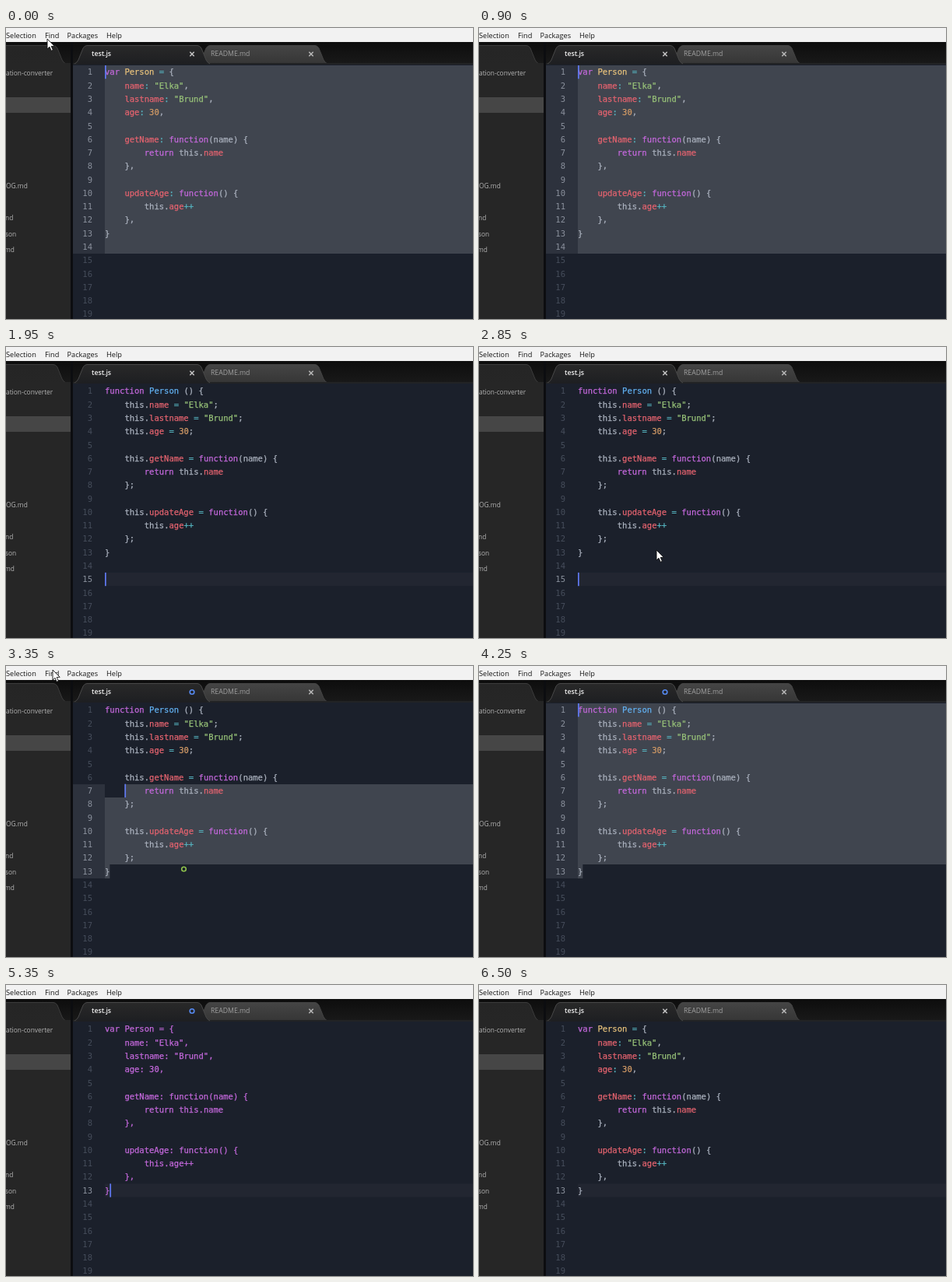
An HTML page with a canvas that plays this animation: 600x374 px, repeating every 6550 ms.

```html
<!DOCTYPE html>
<html lang="en">
<head>
<meta charset="utf-8">
<title>Editor demo</title>
<style>
html, body { margin: 0; width: 100%; height: 100%; overflow: hidden; background: #1b202b; }
canvas { display: block; width: 600px; height: 374px; }
</style>
</head>
<body>
<canvas id="stage" width="600" height="374"></canvas>
<script>
const ctx = document.getElementById('stage').getContext('2d');
const LOOP = 6550, STEP = 50;
const TOP = 48, LINE = 17.28, LEFT = 127, CHAR = 6.345;
const UI = '"Open Sans", "Noto Sans", sans-serif';
const MONO = '10.5px "DejaVu Sans Mono", "Liberation Mono", monospace';
const C = {
  text: '#abb2bf', key: '#c468dc', red: '#e4636f', green: '#98c379', num: '#d19a66',
  type: '#e5c07b', fn: '#61afef', op: '#56b6c2'
};

const OBJECT = [
  'var Person = {',
  '    name: "Elka",',
  '    lastname: "Brund",',
  '    age: 30,',
  '',
  '    getName: function(name) {',
  '        return this.name',
  '    },',
  '',
  '    updateAge: function() {',
  '        this.age++',
  '    },',
  '}'
];
const CLASS = OBJECT.map((line, i) => {
  if (i === 0) return 'function Person () {';
  return line.replace(/^ {4}(\w+): /, '    this.$1 = ')
    .replace(/,$/, ';');
});

const COMMANDS = [
  'Editor: *Join Lines', '*Js Object Notation Converter', 'Bookmarks: *Jump To Next',
  'Bookmarks: *Jump To Previous', 'Pro*ject Find: Show', 'Pro*ject Find: Toggle',
  'Pro*ject Find: Show In Current', 'Editor: Copy Pro*ject Path', 'Custom: Delete All Pro*ject'
];

function rect(x, y, w, h, fill) {
  ctx.fillStyle = fill;
  ctx.fillRect(x, y, w, h);
}

function shade(y0, y1, a, b) {
  const g = ctx.createLinearGradient(0, y0, 0, y1);
  g.addColorStop(0, a);
  g.addColorStop(1, b);
  return g;
}

function label(str, x, y, size, color, weight = 400) {
  ctx.font = `${weight} ${size}px ${UI}`;
  ctx.fillStyle = color;
  ctx.fillText(str, x, y);
  return x + ctx.measureText(str).width;
}

function tokenColor(tok, before, after) {
  if (/^(var|function|return)$/.test(tok)) return C.key;
  if (tok[0] === '"') return C.green;
  if (/^\d/.test(tok)) return C.num;
  if (/^(=|:|\++)$/.test(tok)) return C.op;
  if (tok === 'Person') return before.startsWith('var') ? C.type : C.fn;
  if (/^\w/.test(tok) && (before.endsWith('.') || after[0] === ':')) return C.red;
  return C.text;
}

function drawCode(lines, plain) {
  ctx.font = MONO;
  ctx.lineWidth = 0.25;
  lines.forEach((line, i) => {
    for (const m of line.matchAll(/"[^"]*"|\w+|\++|[^\s\w]/g)) {
      const end = m.index + m[0].length;
      const x = LEFT + m.index * CHAR, y = TOP + i * LINE + 12.4;
      ctx.fillStyle = plain ? C.key : tokenColor(m[0], line.slice(0, m.index), line.slice(end));
      ctx.strokeStyle = ctx.fillStyle;
      ctx.fillText(m[0], x, y);
      ctx.strokeText(m[0], x, y);
    }
  });
}

function tabPath(x0, x1) {
  ctx.beginPath();
  ctx.moveTo(x0, 46);
  ctx.quadraticCurveTo(x0 + 3, 45, x0 + 5, 41);
  ctx.lineTo(x0 + 11, 26);
  ctx.quadraticCurveTo(x0 + 13, 22.5, x0 + 16, 22.5);
  ctx.lineTo(x1 - 16, 22.5);
  ctx.quadraticCurveTo(x1 - 13, 22.5, x1 - 11, 26);
  ctx.lineTo(x1 - 5, 41);
  ctx.quadraticCurveTo(x1 - 3, 45, x1, 46);
}

function tab(x0, x1, a, b, edge) {
  tabPath(x0, x1);
  ctx.fillStyle = shade(22, 46, a, b);
  ctx.fill();
  ctx.strokeStyle = edge;
  ctx.lineWidth = 1;
  ctx.stroke();
}

function cross(x, y, color) {
  ctx.strokeStyle = color;
  ctx.lineWidth = 1.5;
  ctx.beginPath();
  ctx.moveTo(x - 2.7, y - 2.7); ctx.lineTo(x + 2.7, y + 2.7);
  ctx.moveTo(x + 2.7, y - 2.7); ctx.lineTo(x - 2.7, y + 2.7);
  ctx.stroke();
}

function ring(x, y, r, color) {
  ctx.strokeStyle = color;
  ctx.lineWidth = 1.6;
  ctx.beginPath();
  ctx.arc(x, y, r, 0, 7);
  ctx.stroke();
}

function drawChrome(dirty) {
  rect(0, 18, 600, 29, shade(18, 46, '#0d0d0d', '#191919'));
  rect(0, 46, 83, 328, '#262626');
  rect(0, 89, 83, 20, '#464646');
  tab(-30, 77, '#252525', '#262626', '#3c3c3c');
  rect(0, 45, 83, 2, '#262626');
  rect(83, 18, 3, 356, '#0c0d10');
  tab(246, 413, '#454545', '#363636', '#444');
  rect(86, 45, 514, 2, '#222325');
  tab(88, 262, '#292929', '#1e1f22', '#484848');
  rect(92, 45, 166, 2, '#1e1f22');
  label('test.js', 110, 36.2, 8.7, '#f2f2f2', 600);
  label('README.md', 263, 36.2, 8.7, '#a0a0a0');
  if (dirty) ring(239, 33.5, 2.8, '#568af2'); else cross(239, 33.5, '#c4c4c4');
  cross(392, 33.5, '#b8b8b8');

  rect(0, 0, 600, 18, '#f2f2f2');
  [['Selection', 0], ['Find', 50], ['Packages', 78.5], ['Help', 129]]
    .forEach(([s, x]) => label(s, x, 13, 9.2, '#161616'));
  [['ation-converter', 0, 58], ['OG.md', 0, 203], ['nd', -1, 244], ['son', -1, 265], ['md', -2, 285]]
    .forEach(([s, x, y]) => label(s, x, y + 3, 8.4, '#b2b2b2'));
}

// sel spans rows from..to (zero based), from column col up to column end on the last row
function drawRows(sel, active) {
  rect(86, 47, 514, 327, '#1b202b');
  if (sel) {
    const y0 = Math.round(TOP + sel.from * LINE);
    const y1 = Math.round(TOP + (sel.to + 1) * LINE);
    rect(86, y0, 41, y1 - y0, '#2d323d');
    for (let r = sel.from; r <= sel.to; r++) {
      const y = Math.round(TOP + r * LINE), next = Math.round(TOP + (r + 1) * LINE);
      const x = r === sel.from ? LEFT + sel.col * CHAR : LEFT;
      const end = r === sel.to && sel.end ? LEFT + sel.end * CHAR : 600;
      rect(x, y, end - x, next - y, '#40454f');
    }
  } else {
    rect(LEFT, TOP + active * LINE, 600 - LEFT, LINE, '#222631');
  }
  ctx.font = MONO;
  ctx.textAlign = 'right';
  for (let r = 0; r < 19; r++) {
    const lit = sel ? r >= sel.from && r <= sel.to : r === active;
    ctx.fillStyle = lit ? '#8b919d' : '#464d5b';
    ctx.fillText(r + 1, 111, TOP + r * LINE + 12.4);
  }
  ctx.textAlign = 'left';
}

function drawPalette(query, chosen) {
  ctx.save();
  ctx.shadowColor = 'rgba(0,0,0,.6)';
  ctx.shadowBlur = 5;
  rect(498, 18, 110, 304, '#131314');
  ctx.restore();
  rect(507, 27, 93, 21, '#1d1e20');
  label(query, 511, 41.5, 11.5, '#eee');
  rect(511 + (query ? 4 : 0), 31, 1, 13, '#777');
  ctx.save();
  ctx.beginPath();
  ctx.rect(506, 57, 94, 257);
  ctx.clip();
  COMMANDS.forEach((cmd, i) => {
    const y = 57 + i * 29.65, on = i === chosen;
    rect(506, y, 94, 28.7, on ? '#5179c5' : '#1c1d1f');
    const [head, tail] = cmd.split('*');
    const color = on ? '#fff' : '#a6a6a6';
    let x = label(head, 514, y + 18, 8.7, color);
    x = label(tail[0], x, y + 18, 8.7, query ? '#fff' : color, query ? 700 : 400);
    label(tail.slice(1), x, y + 18, 8.7, color);
  });
  ctx.restore();
}

function drawMouse([x, y]) {
  ctx.beginPath();
  [[0, 0], [0, 13], [3, 10.3], [5.2, 15.3], [7.4, 14.3], [5.2, 9.5], [9.2, 9.3]]
    .forEach(([dx, dy]) => ctx.lineTo(x + dx, y + dy));
  ctx.closePath();
  ctx.fillStyle = '#fff';
  ctx.fill();
  ctx.strokeStyle = '#111';
  ctx.lineWidth = 0.9;
  ctx.stroke();
}

// Each run is [start, end, x0, y0, x1, y1]; the pointer hides outside them.
const MOUSE = [
  [0, 600, 53, 14, 190, 333], [600, 900, 190, 333, 190, 333],
  [2300, 2800, 412, 240, 228, 261], [2800, 3150, 228, 261, 228, 261],
  [3150, 3350, 228, 261, 60, 5], [3350, 3500, 60, 5, 53, 14],
  [3500, 3950, 53, 14, 468, 258], [3950, 4200, 468, 258, 468, 258]
];

function mouseAt(t) {
  const run = MOUSE.find(m => t >= m[0] && t < m[1]);
  if (!run) return null;
  const [a, b, x0, y0, x1, y1] = run;
  const p = (t - a) / (b - a), e = p * p * (3 - 2 * p);
  return [x0 + (x1 - x0) * e, y0 + (y1 - y0) * e];
}

function selection(t) {
  if (t < 1800) return { from: 0, to: 13, col: 0 };
  if (t >= 3200 && t < 5000) {
    const from = t < 3400 ? Math.round(12 - (t - 3200) / 25) : 0;
    return { from, to: 12, col: from === 6 ? 4 : 0, end: 1 };
  }
  return null;
}

function paletteAt(t) {
  if (t >= 1100 && t < 1800) return [t < 1300 ? '' : 'j', t < 1600 ? 0 : 1];
  if (t >= 4500 && t < 5000) return [t < 4650 ? '' : 'j', t < 4850 ? 0 : 1];
  return null;
}

function drawCaret(t, sel, active) {
  const base = [5000, 3400, 3200, 2900, 1800, 0].find(b => t >= b);
  if ((t - base) % 800 >= 400) return;
  const row = sel ? sel.from : active;
  const col = sel ? sel.col : active === 12 ? 1 : 0;
  rect(LEFT + col * CHAR, TOP + row * LINE, 1.7, LINE, '#6079f4');
}

function draw(t) {
  const sel = selection(t), palette = paletteAt(t), mouse = mouseAt(t);
  const isClass = t >= 1800 && t < 5000;
  const active = isClass && t < 2900 ? 14 : 12;
  const dirty = (t >= 1800 && t < 1900) || (t >= 2900 && t < 5900);
  drawRows(sel, active);
  drawCode(isClass ? CLASS : OBJECT, t >= 5000 && t < 5500);
  if (!palette) drawCaret(t, sel, active);
  drawChrome(dirty);
  if (palette) drawPalette(...palette);
  if (t >= 3150 && t < 3400) ring(228.5, 261, 2.8, '#8fc24c');
  if (mouse) drawMouse(mouse);
}

const start = performance.now();
function tick() {
  const t = (performance.now() - start) % LOOP;
  draw(Math.floor(t / STEP) * STEP);
  requestAnimationFrame(tick);
}
tick();
</script>
</body>
</html>
```
